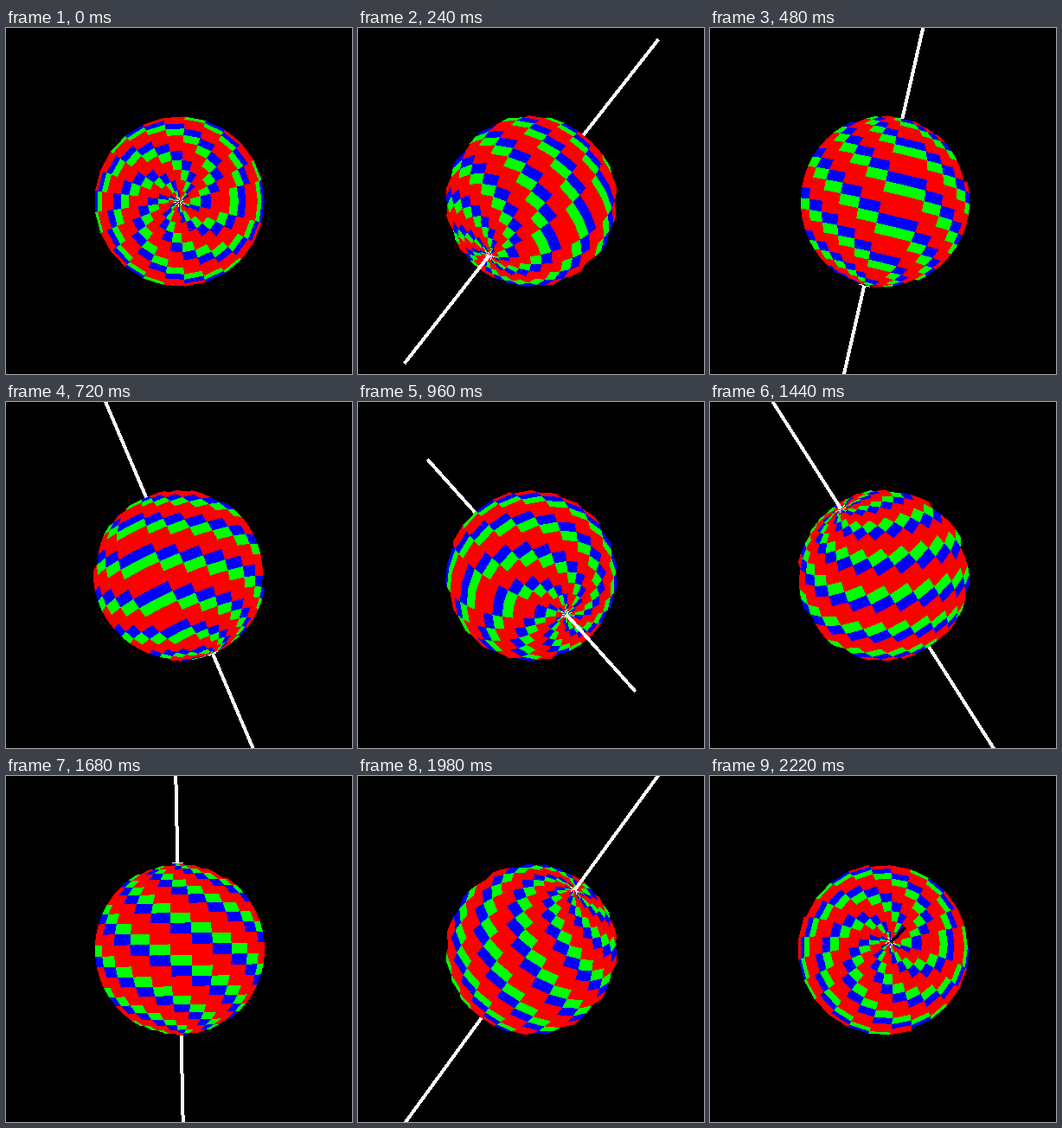
Recreate the animation shown at these times as an HTML page. Size 400 by 400 pixels, loop 2.25 s.

```html
<!DOCTYPE html>
<html lang="en">
<head>
<meta charset="utf-8">
<title>Tumbling globe</title>
<style>
  html, body { margin: 0; width: 100%; height: 100%; overflow: hidden; background: #000; }
  svg { display: block; width: 100vw; height: 100vh; shape-rendering: crispEdges; }
</style>
</head>
<body>
<svg viewBox="0 0 400 400">
  <rect width="400" height="400" fill="#000"/>
  <path id="back" stroke="#fff" stroke-width="4"/>
  <path id="red" fill="#f00"/>
  <path id="green" fill="#0f0"/>
  <path id="blue" fill="#00f"/>
  <path id="star" stroke="#fff" stroke-width="1" fill="none"/>
  <path id="casing" stroke="#000" stroke-width="4"/>
  <path id="front" stroke="#fff"/>
</svg>
<script>
const FRAMES = 75, STEP = 30;
const CELLS = 25, RADIUS = 100, AXIS = 302, MID = 200.5;
const MIN_FACING = Math.cos(80 * Math.PI / 180);
const TAU = 2 * Math.PI;
const el = Object.fromEntries(
  [...document.querySelectorAll('path')].map(p => [p.id, p]));

// Unit vector at colatitude a and longitude b; the pole is +z.
const onSphere = (a, b) =>
  [Math.sin(a) * Math.cos(b), Math.sin(a) * Math.sin(b), Math.cos(a)];

const gridPoint = (k, j) => onSphere(Math.PI * k / CELLS, TAU * j / CELLS);
const table = (n, fn) =>
  Array.from({ length: n }, (_, k) => Array.from({ length: n }, (_, j) => fn(k, j)));

const corners = table(CELLS + 1, gridPoint);
const centres = table(CELLS, (k, j) => gridPoint(k + 0.5, j + 0.5));

// Tilt about x, then turn the other way about y.
function rotator(angle) {
  const c = Math.cos(angle), s = Math.sin(angle);
  return ([x, y, z]) => {
    const depth = y * s + z * c;
    return [x * c - depth * s, y * c - z * s, x * s + depth * c];
  };
}

const place = ([x, y], r = RADIUS) => [MID + r * x, MID - r * y];
const fmt = p => p[0].toFixed(2) + ' ' + p[1].toFixed(2);
const line = (a, b) => `M${fmt(a)}L${fmt(b)}`;
const poly = pts => 'M' + pts.map(fmt).join('L') + 'Z';

// Only cells facing the viewer well enough are drawn.
function drawBall(rotate) {
  const pts = corners.map(row => row.map(v => place(rotate(v))));
  const d = { red: '', green: '', blue: '' };
  const hues = ['red', 'green', 'blue', 'red'];
  for (let k = 0; k < CELLS; k++) {
    for (let j = 0; j < CELLS; j++) {
      if (rotate(centres[k][j])[2] < MIN_FACING) continue;
      d[hues[(k - j + 100) % 4]] +=
        poly([pts[k][j], pts[k + 1][j], pts[k + 1][j + 1], pts[k][j + 1]]);
    }
  }
  for (const hue in d) el[hue].setAttribute('d', d[hue]);
}

function drawAxis(rotate) {
  const pole = rotate([0, 0, 1]);
  const near = line(place(pole), place(pole, AXIS));
  el.back.setAttribute('d', line(place(pole, 0), place(pole, -AXIS)));
  el.casing.setAttribute('d', near);
  el.front.setAttribute('d', near);
  // The white core narrows and goes dark when seen end on.
  const tilt = Math.hypot(pole[0], pole[1]);
  el.front.setAttribute('stroke-width', Math.max(0, Math.min(4, 15 * (tilt - 0.12))));

  let d = '';
  for (let i = 0; i < 10; i++) {
    const b = TAU * (i + 0.3) / 10;
    const inner = i % 2 ? 0.035 : 0.01, outer = i % 2 ? 0.07 : 0.045;
    d += line(place(rotate(onSphere(inner, b))), place(rotate(onSphere(outer, b))));
  }
  el.star.setAttribute('d', d);
}

let shown = -1;
function render(ms) {
  const n = Math.floor(Math.max(0, ms) / STEP) % FRAMES;
  if (n === shown) return;
  shown = n;
  const rotate = rotator(TAU * n / FRAMES);
  drawBall(rotate);
  drawAxis(rotate);
}

function tick(now) {
  render(now);
  requestAnimationFrame(tick);
}
render(0);
requestAnimationFrame(tick);
</script>
</body>
</html>
```
